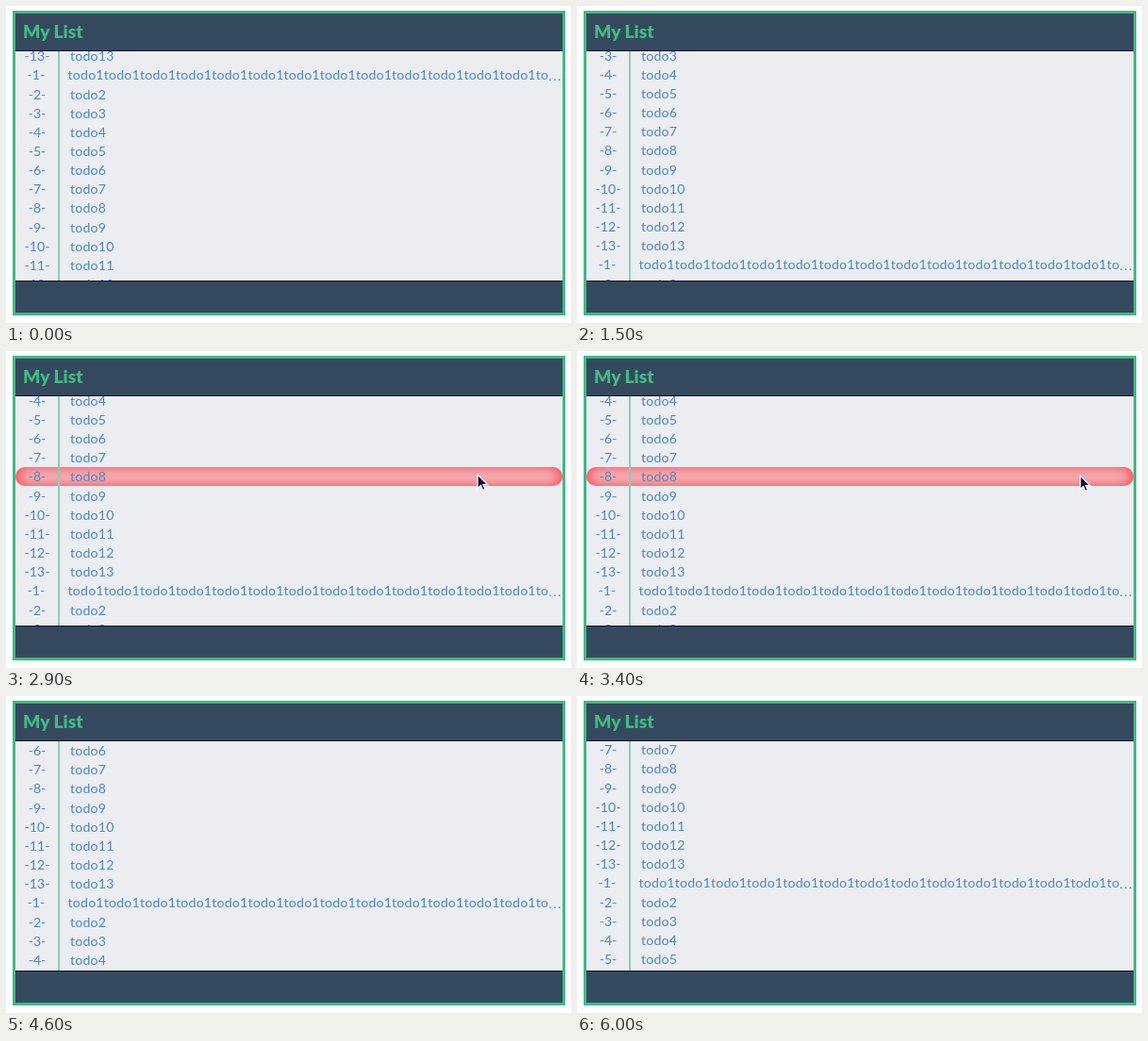
These frames come from a looping animation (599 px wide and 336 px high, 6.1 s). An HTML page:

```html
<!DOCTYPE html>
<html lang="en">
<head>
<meta charset="utf-8">
<title>My List</title>
<style>
  html, body { margin: 0; width: 100%; height: 100%; overflow: hidden; background: #fff; }
  body { position: relative; font: 14.1px/20.17px Lato, sans-serif; color: #4c87c1; }
  .panel { position: absolute; left: 7px; top: 5px; width: 580px; height: 317px;
           border: 3px solid #42b983; background: #35495e; }
  h1 { position: absolute; left: 8px; top: 7px; margin: 0; color: #42b983;
       font-size: 19.2px; font-weight: 900; line-height: 24px; white-space: pre; }
  .list { position: absolute; left: 0; top: 39px; width: 580px; height: 243px; overflow: hidden;
          border: solid #0e1430; border-width: 1px 0; background: #ebedf1; }
  .line { position: absolute; left: 45px; top: 0; width: 2px; height: 100%; background: #8dcfb8; }
  .row { display: flex; height: 20.17px; border-radius: 10px; white-space: nowrap; }
  .row.hover { background: #f3bfc2; box-shadow: inset 0 0 15px #f8303f; }
  .row span { position: relative; top: .2px; }
  .number { width: 46px; margin-right: 12px; text-align: center; }
  .label { letter-spacing: .22px; }
  .dots { letter-spacing: 1.6px; }
  svg { position: absolute; left: 0; top: 0; overflow: visible; }
</style>
</head>
<body>
<div class="panel">
  <h1>My List</h1>
  <div class="list"><div id="rows"></div><div class="line"></div></div>
</div>
<svg id="cursor" width="12" height="18">
  <path d="M0 0V14.5L3.3 11.5L5.5 16.5L8 15.5L5.8 10.6H10.5Z" fill="#0b1030" stroke="#fff" stroke-width="1.2"/>
</svg>
<script>
const LOOP = 6100, STEP = 100, SPEED = 0.0402;
const ROW = 20.17, FIRST_TOP = -5.47, LIST_TOP = 48, COUNT = 13;

// Scrolling rests while the pointer is over the list.
const pauses = [[2003, 3735], [5000, 5860]];

// Pointer visits as [time, x, y] points.
const visits = [
  [[2003, 589, 139], [2300, 490, 132], [2500, 482, 130], [2900, 500, 131],
   [3400, 533.5, 132], [3600, 550, 132], [3735, 588, 133]],
  [[5000, 575, 150], [5300, 520, 160], [5600, 515, 190], [5800, 512, 270], [5920, 511, 316]]
];

const rowsBox = document.getElementById('rows');
const cursor = document.getElementById('cursor');

const rows = Array.from({ length: 21 }, (_, i) => {
  const n = (i + COUNT - 1) % COUNT + 1;
  const label = n === 1 ? 'todo1'.repeat(13) + 'to<span class="dots">...</span>' : 'todo' + n;
  const row = document.createElement('div');
  row.className = 'row';
  row.innerHTML = `<span class="number">-${n}-</span><span class="label">${label}</span>`;
  rowsBox.append(row);
  return row;
});

function scrollAt(t) {
  const rested = pauses.reduce((sum, [from, to]) => sum + Math.max(0, Math.min(t, to) - from), 0);
  return SPEED * (t - rested);
}

function pointerAt(t) {
  for (const path of visits) {
    for (let i = 1; i < path.length; i++) {
      const [t0, x0, y0] = path[i - 1], [t1, x1, y1] = path[i];
      if (t >= t0 && t <= t1) {
        const k = (t - t0) / (t1 - t0);
        return { x: x0 + (x1 - x0) * k, y: y0 + (y1 - y0) * k };
      }
    }
  }
  return null;
}

function draw(t) {
  const top = FIRST_TOP - scrollAt(t);
  rowsBox.style.transform = `translateY(${top}px)`;

  const pointer = pointerAt(t);
  const paused = pauses.some(([from, to]) => t >= from && t <= to);
  const hovered = pointer && paused ? Math.floor((pointer.y - LIST_TOP - top) / ROW) : -1;
  rows.forEach((row, i) => row.classList.toggle('hover', i === hovered));

  cursor.style.display = pointer ? 'block' : 'none';
  if (pointer) cursor.style.transform = `translate(${pointer.x}px, ${pointer.y}px)`;
}

const start = performance.now();
function tick() {
  const t = (performance.now() - start) % LOOP;
  draw(Math.floor(t / STEP) * STEP);
  requestAnimationFrame(tick);
}
tick();
</script>
</body>
</html>
```
